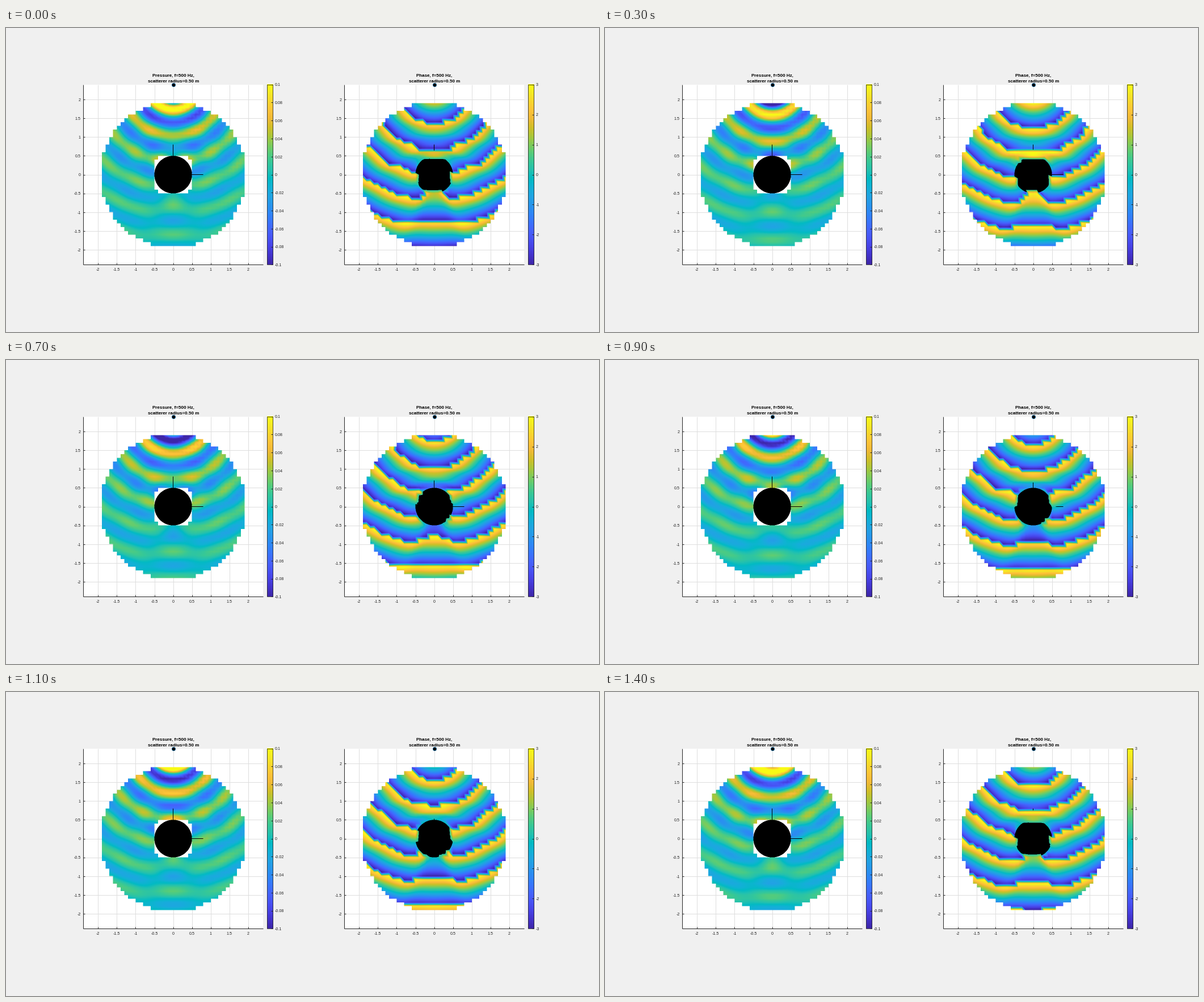
A matplotlib script that plays this animation: 1045x536 px, repeating every 1500 ms.

```python
import numpy as np
import matplotlib.pyplot as plt
from matplotlib.animation import FuncAnimation
from matplotlib.colors import LinearSegmentedColormap
from matplotlib.patches import Rectangle

W, H, DPI = 1045, 536, 100
PT = 72 / DPI                       # points per pixel
FRAMES, INTERVAL = 15, 100
SCALE, CY, HALF = 66.2, 258.5, 2.4  # pixels per metre, centre row, axis limit
TOP, BOTTOM = CY - HALF * SCALE, CY + HALF * SCALE
RADIUS, SOURCE, AXIS_LEN = 0.5, 2.4, 0.8
K = 2 * np.pi * 500 / 343
INK = "#262626"
BOX, SUB = 256, 2                   # raster size in pixels, samples per pixel

PARULA = LinearSegmentedColormap.from_list("parula", [
    (.2422, .1504, .6603), (.2647, .1978, .7952), (.2783, .2559, .8991),
    (.2810, .3228, .9579), (.2699, .3892, .9906), (.2206, .4603, .9973),
    (.1786, .5289, .9682), (.1540, .5902, .9218), (.1248, .6459, .8883),
    (.0689, .6948, .8394), (.0067, .7312, .7660), (.1408, .7584, .6842),
    (.2161, .7843, .5923), (.3406, .8008, .4789), (.5044, .7993, .3480),
    (.6720, .7793, .2227), (.8203, .7498, .1535), (.9393, .7288, .2100),
    (.9970, .7659, .2199), (.9786, .8386, .1766), (.9597, .9135, .1423),
    (.9769, .9839, .0805)])


def hankel(count, x):
    """Spherical Hankel functions of the first kind, orders 0..count-1."""
    e = np.exp(1j * x)
    h = [-1j * e / x, -(x + 1j) * e / x**2]
    for n in range(1, count - 1):
        h.append((2 * n + 1) / x * h[n] - h[n - 1])
    return h


def bessel(count, x):
    """Spherical Bessel functions by downward recurrence."""
    j = np.zeros(62)
    j[60] = 1e-60
    for n in range(60, 0, -1):
        j[n - 1] = (2 * n + 1) / x * j[n] - j[n + 1]
    return j[:count] * (np.sin(x) / x / j[0])


def total_field(x, y, orders=22):
    """Point source above a rigid sphere: direct plus scattered sound."""
    r = np.maximum(np.hypot(x, y), 0.45)
    cos = y / r
    dist = np.maximum(np.hypot(x, y - SOURCE), 1e-3)
    ka = K * RADIUS
    j, ha = bessel(orders + 1, ka), hankel(orders + 1, ka)
    hr, hs = hankel(orders + 1, K * r), hankel(orders + 1, K * SOURCE)
    p = np.exp(1j * K * dist) / (4 * np.pi * dist)
    leg, leg_next = np.ones_like(cos), cos
    for n in range(orders):
        ratio = (n / ka * j[n] - j[n + 1]) / (n / ka * ha[n] - ha[n + 1])
        p = p - 1j * K / (4 * np.pi) * (2 * n + 1) * ratio * hr[n] * hs[n] * leg
        leg, leg_next = leg_next, ((2 * n + 3) * cos * leg_next - (n + 1) * leg) / (n + 2)
    return p.conj()


axis = np.arange(-24, 25) / 10
GX, GY = np.meshgrid(axis, axis)
GR = np.hypot(GX, GY)
INSIDE = (GR < RADIUS + 1e-4) & (np.maximum(abs(GX), abs(GY)) < 0.45)
OUTSIDE = GR > 2 + 1e-6
FIELD = total_field(GX, GY)


class Panel:
    def __init__(self, ax, cx, title, limit, ticks):
        self.cx, self.limit = cx, limit
        self.decorate(ax, title, ticks)
        self.x0, self.y0 = int(cx) - BOX // 2, int(CY) - BOX // 2
        steps = (np.arange(BOX * SUB) + 0.5) / SUB
        self.x, self.y = np.meshgrid((self.x0 + steps - cx) / SCALE,
                                     (CY - self.y0 - steps) / SCALE)
        u, v = (self.x + HALF) * 10, (self.y + HALF) * 10
        self.i, self.j = u.astype(int), v.astype(int)
        u, v = u - self.i, v - self.j
        # Each cell is two flat triangles, split from upper left to lower right.
        w11 = np.maximum(u + v - 1, 0)
        self.weights = (np.maximum(1 - u - v, 0), u - w11, v - w11, w11)
        r2 = self.x**2 + self.y**2
        self.ball = np.where(r2 < RADIUS**2,
                             np.sqrt(np.maximum(RADIUS**2 - r2, 0)), -9)
        col = np.floor(self.x0 + steps) == int(cx)
        row = np.floor(self.y0 + steps) == int(CY)
        self.lines = (col[None, :] & (self.y > 0) & (self.y < AXIS_LEN)
                      | row[:, None] & (self.x > 0) & (self.x < AXIS_LEN))
        self.image = ax.imshow(np.zeros((BOX, BOX, 4)), interpolation="nearest",
                               extent=(self.x0, self.x0 + BOX, self.y0 + BOX, self.y0),
                               zorder=3)

    def decorate(self, ax, title, ticks):
        cx = self.cx
        left, right = cx - HALF * SCALE, cx + HALF * SCALE
        ax.add_patch(Rectangle((left, TOP), right - left, BOTTOM - TOP, fc="w", lw=0))

        def line(xs, ys, color=INK, z=4):
            ax.plot(xs, ys, color=color, lw=PT, zorder=z, solid_capstyle="butt")

        def label(x, y, text, **kw):
            ax.text(x, y, text, color=INK, fontsize=7.2 * PT, va="center_baseline", **kw)

        for n in range(-4, 5):
            value = n / 2
            x, y = cx + value * SCALE, CY - value * SCALE
            line([x, x], [TOP, BOTTOM], "#dedede", 1)
            line([left, right], [y, y], "#dedede", 1)
            line([x, x], [BOTTOM, BOTTOM - 3])
            line([left, left + 3], [y, y])
            label(x, 425.6, f"{value:g}", ha="center")
            label(left - 4, y + 0.3, f"{value:g}", ha="right")
        line([left, left], [TOP, BOTTOM])
        line([left, right], [BOTTOM, BOTTOM])

        bar = left + 323.8
        ax.imshow(np.linspace(1, 0, 256)[:, None], cmap=PARULA, zorder=2,
                  extent=(bar, bar + 10.6, BOTTOM, TOP))
        ax.add_patch(Rectangle((bar, TOP), 10.6, BOTTOM - TOP, fill=False,
                               ec=INK, lw=0.8 * PT, zorder=4))
        for value in ticks:
            y = CY - value / self.limit * HALF * SCALE
            line([bar + 7.6, bar + 10.6], [y, y])
            label(bar + 14, y + 0.3, f"{value:g}", ha="left")

        for y, text in ((86, title), (96, "scatterer radius=0.50 m")):
            ax.text(cx + 0.4, y, text, color="k", fontsize=8 * PT, weight="bold",
                    ha="center", va="baseline", zorder=5)
        ax.plot(cx + 0.2, TOP + 0.2, "o", ms=6.4 * PT, mfc="k", mec="#0072bd",
                mew=0.6 * PT, zorder=6)

    def draw(self, grid, raised):
        i, j = self.i, self.j
        corners = grid[j, i], grid[j, i + 1], grid[j + 1, i], grid[j + 1, i + 1]
        value = sum(w * c for w, c in zip(self.weights, corners))
        blank = np.isnan(value)
        value = np.where(blank, 0, value)
        height = value if raised else 0
        rgba = PARULA(np.clip(value / self.limit / 2 + 0.5, 0, 1))
        rgba[blank] = 0
        rgba[(self.ball > height) | self.lines & (height <= 0)] = (0, 0, 0, 1)
        rgba[..., :3] *= rgba[..., 3:]
        rgba = rgba.reshape(BOX, SUB, BOX, SUB, 4).mean(axis=(1, 3))
        rgba[..., :3] /= np.maximum(rgba[..., 3:], 1e-6)
        self.image.set_data(np.clip(rgba, 0, 1))


plt.rcParams["font.family"] = "Liberation Sans"
plt.rcParams["axes.unicode_minus"] = False
fig = plt.figure(figsize=(W / DPI, H / DPI), dpi=DPI, facecolor="#f0f0f0")
ax = fig.add_axes([0, 0, 1, 1])
pressure = Panel(ax, 294.6, "Pressure, f=500 Hz,", 0.1, np.arange(-5, 6) / 50)
phase = Panel(ax, 754.6, "Phase, f=500 Hz,", 3, range(-3, 4))
ax.set(xlim=(0, W), ylim=(H, 0), aspect="auto")
ax.axis("off")


def update(frame):
    wave = FIELD * np.exp(2j * np.pi * frame / FRAMES)
    pressure.draw(np.where(INSIDE | OUTSIDE, np.nan, wave.real), raised=False)
    angle = np.where(INSIDE, 0, np.angle(wave))
    phase.draw(np.where(OUTSIDE, np.nan, angle), raised=True)
    return pressure.image, phase.image


anim = FuncAnimation(fig, update, frames=FRAMES, interval=INTERVAL, repeat=True)
plt.show()
```
